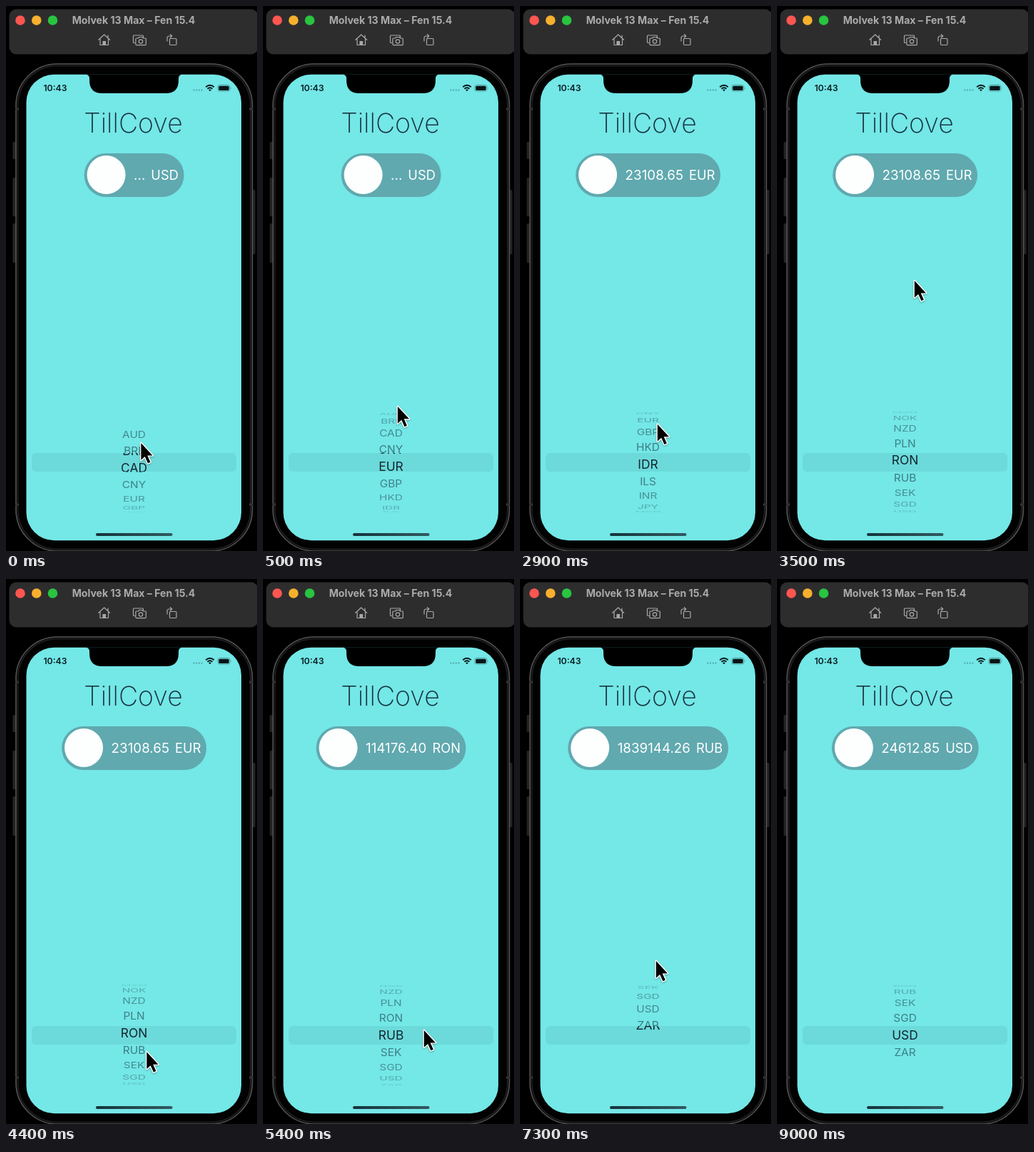
An HTML page that plays this animation: 352x762 px, repeating every 9.5 s.

```html
<!DOCTYPE html>
<html lang="en">
<head>
<meta charset="utf-8">
<title>Currency picker</title>
<style>
  html, body { margin: 0; width: 100%; height: 100%; overflow: hidden; background: #000; }
  body { position: relative; font-family: Inter, Roboto, sans-serif; }
  svg { position: absolute; left: 0; top: 0; display: block; }
  text { text-anchor: middle; }
  .icon { fill: none; stroke: #a9a9a9; stroke-width: 1.2; stroke-linejoin: round; stroke-linecap: round; }
  .button { fill: #242424; }
  #outer { font-size: 15.4px; fill: #14303a; }
  #inner { font-size: 17.4px; fill: #14262e; }
  #stage { position: absolute; left: 0; top: 0; width: 359px; height: 0; }
  #pill {
    position: absolute; left: 50%; top: 205.5px; height: 61.5px; transform: translateX(-50%);
    display: flex; align-items: center; box-sizing: border-box; padding: 0 8px 0 4.5px;
    border-radius: 31px; background: #60a9af; color: #fff; white-space: nowrap;
  }
  #disc { width: 54px; height: 54px; border-radius: 50%; background: #fdfefe; margin-right: 11.5px; }
  #rate { font-size: 18.8px; margin-right: 8px; }
  #unit { font-size: 18.3px; }
</style>
</head>
<body>
<svg width="352" height="762" viewBox="0 0 352 762">
  <defs>
    <clipPath id="band"><rect x="36" y="625" width="287" height="26"/></clipPath>
    <clipPath id="around"><path d="M36 560H323V625H36ZM36 651H323V715H36Z"/></clipPath>
    <linearGradient id="bar">
      <stop offset="0" stop-color="#15333c"/><stop offset="1" stop-color="#315a60"/>
    </linearGradient>
  </defs>

  <!-- window bar -->
  <rect x="4.5" y="4.5" width="349" height="63" rx="10" fill="#2e2d2e"/>
  <circle cx="20" cy="20" r="6.8" fill="#fc5650"/>
  <circle cx="42.8" cy="20" r="6.8" fill="#f7b02d"/>
  <circle cx="65.5" cy="20" r="6.8" fill="#29c440"/>
  <text x="179" y="25" font-size="14.1" font-weight="700" fill="#acabac">Molvek 13 Max – Fen 15.4</text>
  <g class="icon">
    <path d="M129.8 47.3L137.7 40L145.6 47.3M132 46V54.5H143.5V46M143 44V41"/>
    <path d="M136 54V49.5H139.5V54Z" fill="#a9a9a9"/>
    <path d="M181 51.5H179.5Q178.5 51.5 178.5 50.5V42Q178.5 41 179.5 41H191.5Q192.5 41 192.5 42V43.5"/>
    <path d="M183 45H185.5L186.8 43.5H191.2L192.5 45H195.2Q196.3 45 196.3 46V53.5Q196.3 54.6 195.2 54.6H183Q181.9 54.6 181.9 53.5V46Q181.9 45 183 45Z"/>
    <circle cx="189" cy="49.6" r="2.7"/>
    <rect x="229.5" y="45.5" width="9.5" height="9" rx="1.2"/>
    <path d="M226 49V45Q226 42 229 42H232.5M230.3 39.6L232.8 42L230.3 44.4"/>
  </g>

  <!-- phone -->
  <rect class="button" x="9.5" y="190" width="5" height="24" rx="1.5"/>
  <rect class="button" x="9.5" y="240" width="5" height="54" rx="1.5"/>
  <rect class="button" x="9.5" y="304" width="5" height="55" rx="1.5"/>
  <rect class="button" x="344.5" y="257" width="5" height="90" rx="1.5"/>
  <rect x="14" y="81" width="331.5" height="681" rx="58" fill="#020202" stroke="#555" stroke-width="1.6"/>
  <rect x="16.5" y="83.5" width="326.5" height="676" rx="55.5" fill="none" stroke="#1d1d1d" stroke-width="2"/>
  <path d="M13 144H18M341 144H346M13 697H18M341 697H346" stroke="#333" stroke-width="3"/>
  <rect x="28.5" y="95.7" width="301.5" height="651.5" rx="39" fill="#74e7e7"/>
  <path d="M112 95.5Q117 96.5 117 101V104Q117 122 135 122H224Q242 122 242 104V101Q242 96.5 247 95.5Z" fill="#000"/>

  <!-- status bar -->
  <text x="69" y="119.3" font-size="12.3" font-weight="600" fill="#0b2024">10:43</text>
  <path d="M263.5 117.6H275" stroke="#4ba5a8" stroke-width="2.2" stroke-linecap="round" stroke-dasharray="0 3.67"/>
  <path d="M280.2 113.3Q286 108.4 291.8 113.3M282.5 115.8Q286 112.9 289.5 115.8" fill="none" stroke="#061517" stroke-width="1.9"/>
  <path d="M284.2 117.3Q286 115.9 287.8 117.3L286 119.2Z" fill="#061517"/>
  <rect x="297" y="110.4" width="17" height="8.8" rx="2.6" fill="none" stroke="#4a9b9e" stroke-width=".9"/>
  <rect x="298.3" y="111.7" width="14.4" height="6.2" rx="1.5" fill="#061517"/>
  <path d="M315.3 113.3Q316.8 114.8 315.3 116.3Z" fill="#4a9b9e"/>

  <text x="178.5" y="177" font-size="37.5" font-weight="200" fill="#17343f">TillCove</text>

  <!-- picker -->
  <rect x="36" y="625" width="287" height="26" rx="6" fill="#6cdadb"/>
  <g id="outer" clip-path="url(#around)"></g>
  <g id="inner" clip-path="url(#band)"></g>
  <rect x="126" y="737" width="107.5" height="4" rx="2" fill="url(#bar)"/>

  <path id="cursor" d="M1.8 3V26.8L7.2 21.9L11.4 31.2L14.9 29.7L10.7 20.4H18Z"
    fill="#000" stroke="#fff" stroke-width="2.9" stroke-linejoin="round" paint-order="stroke"
    style="filter: drop-shadow(0 1px 1px rgba(0,0,0,.3))"/>
</svg>
<div id="stage"><div id="pill"><span id="disc"></span><span id="rate"></span><span id="unit"></span></div></div>

<script>
const LOOP = 9500, STEP = 100, POINTER_GONE = 9000;
const RADIUS = 70, ROW_ANGLE = Math.PI / 9, CENTER = 638;
const codes = 'AUD BRL CAD CNY EUR GBP HKD IDR ILS INR JPY MXN NOK NZD PLN RON RUB SEK SGD USD ZAR'.split(' ');

// Each move eases the wheel row and the pointer tip together, so drags stay linked.
const origin = { row: 0, x: 188, y: 649 };
const moves = [
  { from: -550, to: 685, row: 4, x: 187, y: 551 },
  { from: 1100, to: 1500, x: 250, y: 555 },
  { from: 2200, to: 2600, x: 191, y: 652 },
  { from: 2600, to: 3500, row: 15.12, y: 381 },
  { from: 3600, to: 4000, row: 15, x: 196, y: 662 },
  { from: 4300, to: 4700, row: 16, x: 193, y: 638 },
  { from: 5000, to: 5400, x: 224, y: 628 },
  { from: 5600, to: 6500, x: 189, y: 655 },
  { from: 6800, to: 7300, row: 20.58, y: 531 },
  { from: 7300, to: 7500, row: 19, y: 570 },
  { from: 7500, to: 7800, x: 268, y: 501 }
];

const quotes = [
  { at: 0, rate: '...', unit: 'USD' },
  { at: 1800, rate: '23108.65', unit: 'EUR' },
  { at: 4500, rate: '114176.40', unit: 'RON' },
  { at: 5600, rate: '1839144.26', unit: 'RUB' },
  { at: 8600, rate: '24612.85', unit: 'USD' }
];

const $ = id => document.getElementById(id);
const smooth = k => k * k * (3 - 2 * k);

function poseAt(t) {
  const pose = { ...origin };
  for (const { from, to, ...goal } of moves) {
    if (t <= from) break;
    const k = smooth(Math.min(1, (t - from) / (to - from)));
    for (const key in goal) pose[key] += (goal[key] - pose[key]) * k;
  }
  return pose;
}

function makeRows(group) {
  return codes.map(code => {
    const row = document.createElementNS('http://www.w3.org/2000/svg', 'text');
    row.textContent = code;
    row.setAttribute('y', '.364em');
    group.append(row);
    return row;
  });
}

const outer = makeRows($('outer'));
const inner = makeRows($('inner'));

function turnWheel(position) {
  codes.forEach((_, i) => {
    const angle = (i - position) * ROW_ANGLE;
    const depth = Math.abs(angle) < Math.PI / 2 ? Math.cos(angle) : 0;
    const place = `translate(179.5 ${CENTER + RADIUS * Math.sin(angle)}) scale(1 ${depth})`;
    for (const row of [outer[i], inner[i]]) {
      row.setAttribute('visibility', depth ? 'visible' : 'hidden');
      row.setAttribute('transform', place);
    }
    outer[i].setAttribute('opacity', 0.1 + 0.5 * depth);
  });
}

function draw(t) {
  const { row, x, y } = poseAt(t);
  turnWheel(row);
  $('cursor').setAttribute('transform', `translate(${x} ${y})`);
  $('cursor').setAttribute('visibility', t < POINTER_GONE ? 'visible' : 'hidden');
  const { rate, unit } = quotes.filter(q => q.at <= t).pop();
  $('rate').textContent = rate;
  $('unit').textContent = unit;
}

const start = performance.now();
let last = -1;
function tick() {
  const t = Math.floor((performance.now() - start) % LOOP / STEP) * STEP;
  if (t !== last) draw(last = t);
  requestAnimationFrame(tick);
}
tick();
</script>
</body>
</html>
```
